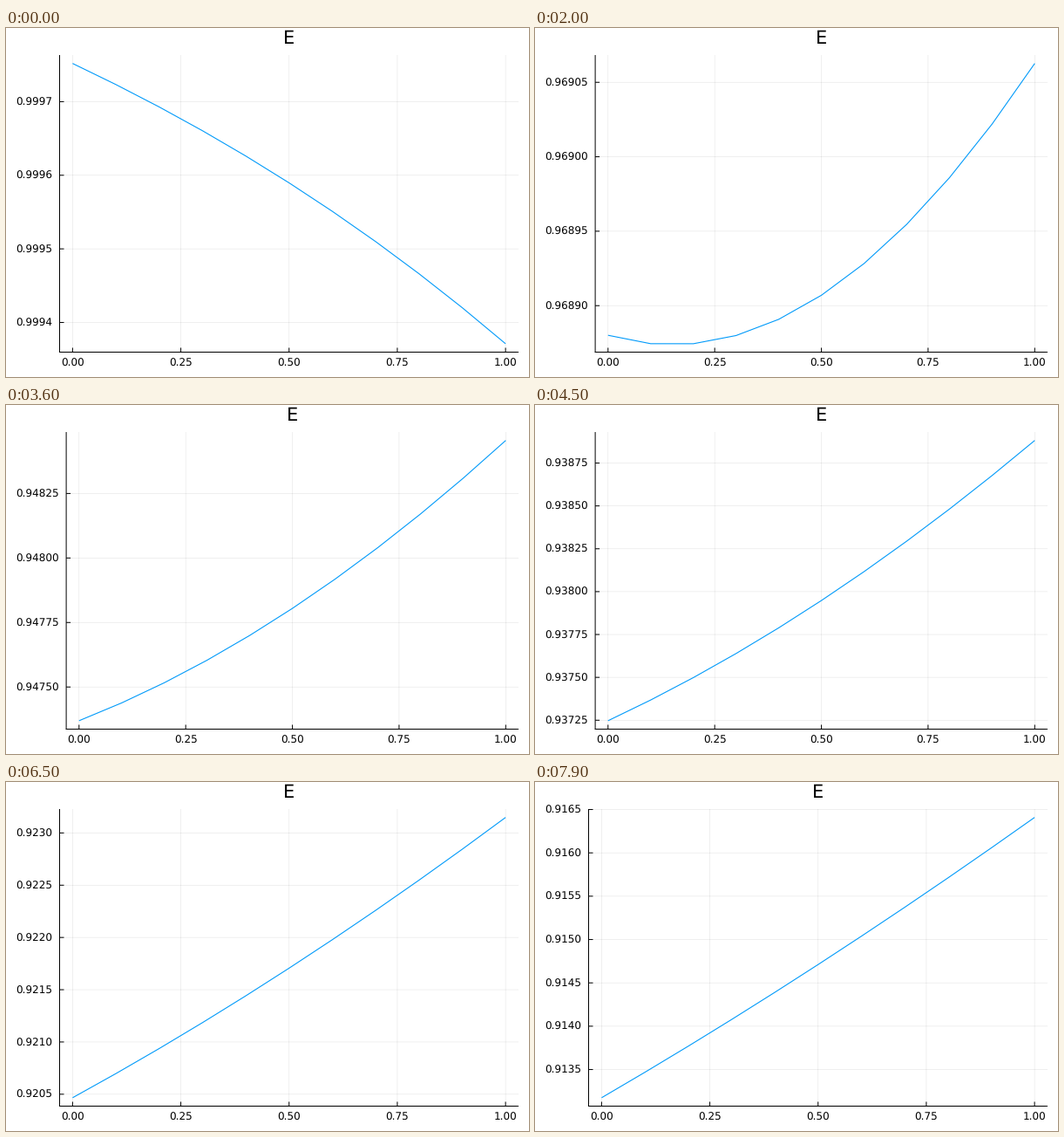
Animation, 600 px wide and 400 px high, one loop 8 s. Source, as a matplotlib script:

```python
import matplotlib.pyplot as plt
import numpy as np
from matplotlib.animation import FuncAnimation
from numpy.polynomial import Polynomial

W, H, FRAMES, STEP_MS = 600, 400, 80, 100
TOP, BOTTOM, RIGHT = 31.0, 371.5, 588.0
PT = 0.72  # points per pixel at 100 dpi
BLUE = "#009AFA"

plt.rcParams.update({
    "font.family": "DejaVu Sans",
    "text.hinting": "none",
    "path.snap": False,
    "lines.solid_capstyle": "butt",
})

# Start value, slope and curvature of E(x) over time in seconds, in units of 1e-4.
start = Polynomial([9997.519, -158.094, -0.49853, 1.229143, -0.007242, -0.0087895, 0.0004399])
slope = Polynomial([-2.681, -1.6447, 1.3772, 0, -0.02064, 0.001275])
curvature = Polynomial([-1.127, 2.0386, 0.002, -0.0557, 0.004])
xs = np.linspace(0, 1, 11)


def curve(t):
    bend = -0.2 * xs * (xs - 0.5) * (xs - 1)
    return (start(t) + slope(t) * xs + curvature(t) * xs**2 + bend) * 1e-4


def pick_ticks(lo, hi):
    """Choose 4 to 8 round ticks by count, coverage and niceness."""
    niceness = {1: 1.0, 5: 0.9, 2: 0.7, 2.5: 0.5, 3: 0.2}
    span = hi - lo
    order = int(np.floor(np.log10(span)))
    best, found = -np.inf, None
    for z in range(order - 1, order + 2):
        for q, nice in niceness.items():
            step = q * 10.0**z
            ticks = np.arange(np.ceil(lo / step), np.floor(hi / step) + 1) * step
            n = len(ticks)
            if not 4 <= n <= 8:
                continue
            score = (0.25 * (1 - abs(n - 5) / 5)
                     + 0.5 * span / ((n - 1) * step) + 0.25 * nice)
            if score > best:
                best, found = score, ticks
    return found


def decimals(ticks):
    d = 1
    while np.any(np.abs(np.round(ticks, d) - ticks) > 1e-9):
        d += 1
    return d


fig = plt.figure(figsize=(W / 100, H / 100), dpi=100, facecolor="white")
ax = fig.add_axes([0, 0, 1, 1])


def line(x, y, color="black", width=1.0, **kw):
    ax.plot(x, y, color=color, lw=width * PT, **kw)


def grid(x, y):
    line(x, y, width=0.6, alpha=0.1)


def label(x, y, text, size=12, ha="center"):
    ax.text(x, y, text, fontsize=size * PT, ha=ha, va="baseline", color="black")


def draw(frame):
    ax.cla()
    ax.set_xlim(0, W)
    ax.set_ylim(H, 0)
    ax.axis("off")

    ys = curve(frame * STEP_MS / 1000)
    pad = 0.03 * (ys.max() - ys.min())
    lo, hi = ys.min() - pad, ys.max() + pad
    yticks = pick_ticks(lo, hi)
    digits = decimals(yticks)
    left = 61.5 + 7.6 * (digits - 4)  # wider labels push the axis right

    def px(x):
        return left + (x + 0.03) / 1.06 * (RIGHT - left)

    def py(y):
        return BOTTOM - (y - lo) / (hi - lo) * (BOTTOM - TOP)

    for x in np.linspace(0, 1, 5):
        grid([px(x)] * 2, [TOP, BOTTOM])
        line([px(x)] * 2, [BOTTOM - 5, BOTTOM])
        label(px(x), 387.8, f"{x:.2f}")
    for y in yticks:
        grid([left, RIGHT], [py(y)] * 2)
        line([left, left + 5], [py(y)] * 2)
        label(left - 8, py(y) + 4.4, f"{y:.{digits}f}", ha="right")

    line([left - 0.5, RIGHT], [BOTTOM] * 2)
    line([left] * 2, [TOP, BOTTOM])
    line(px(xs), py(ys), BLUE, 1.1)
    label((left + RIGHT) / 2, 18.4, "E", size=21)
    return []


anim = FuncAnimation(fig, draw, frames=FRAMES, interval=STEP_MS,
                     init_func=lambda: [], repeat=True, repeat_delay=0)
plt.show()
```
